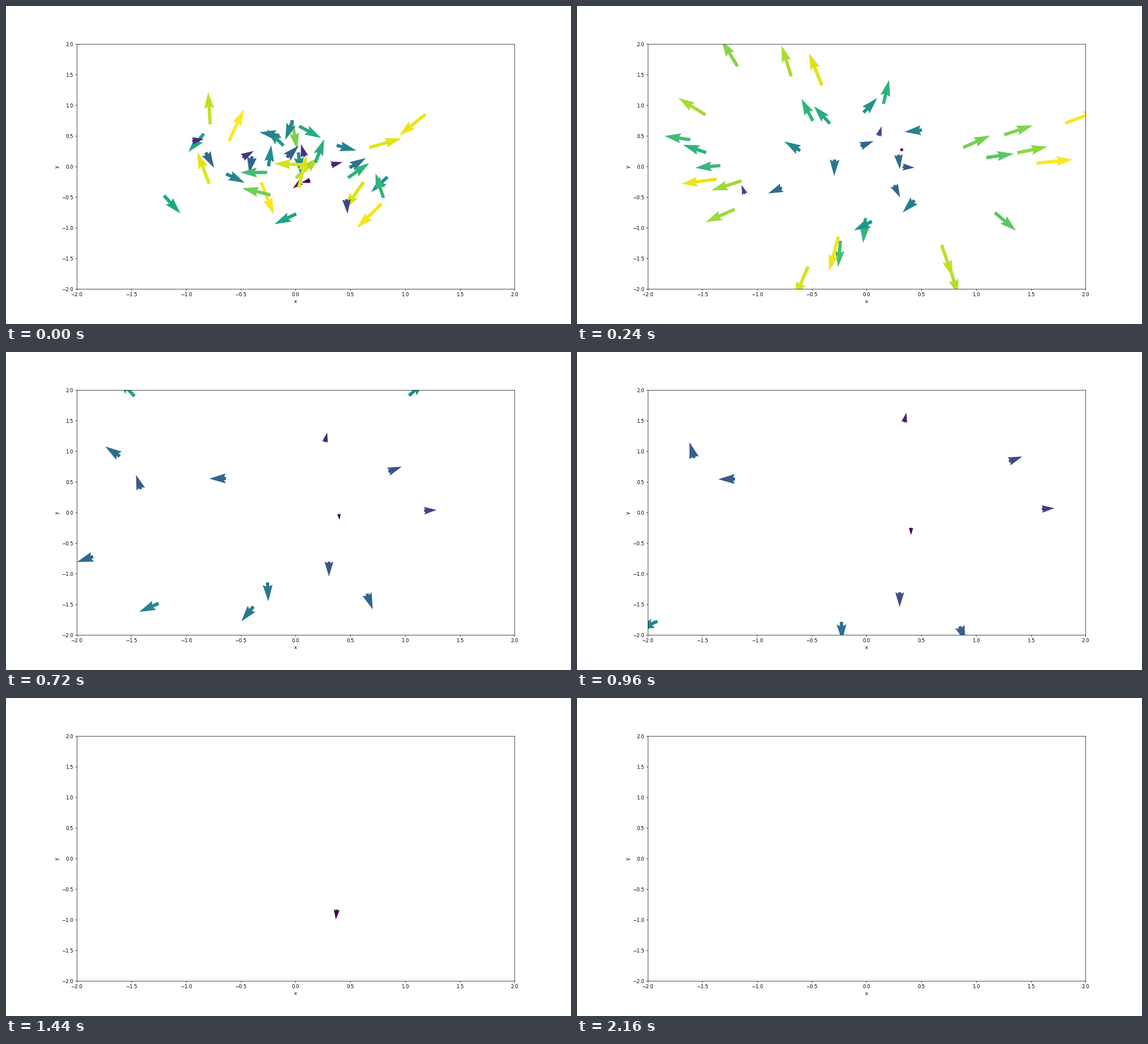
Animation, 998 px wide and 561 px high, one loop 8 s. Source, as a matplotlib script:

```python
import numpy as np
import matplotlib.pyplot as plt
from matplotlib.animation import FuncAnimation

W, H, DPI = 998, 561, 62.375
TICK, STEP, LOOP = 20, 60, 8000          # milliseconds
END = 36                                 # step at which the stage is empty
DRIFT = np.array([0.93, 0.52])           # pixels moved per step and arrow pixel
CENTRE, REACH = np.array([512, 283]), np.array([186, 105])
TAU = 1.5                                # steps in which the starting motion fades
SWARM = 25

rng = np.random.default_rng(4)


def polar(length, angle):
    return np.c_[length * np.cos(angle), length * np.sin(angle)]


# Slow darts: pixel positions at steps 8 and 16; the first two also curve.
slow = np.array([
    (583, 266, 590, 310), (269, 291, 207, 187), (498, 222, 279, 224),
    (549, 194, 578, 124), (588, 229, 763, 193), (656, 283, 821, 277),
    (571, 316, 570, 424), (599, 369, 676, 484), (457, 337, 467, 476),
    (397, 412, 142, 475), (296, 220, 106, 148), (261, 341, 47, 381),
    (517, 394, 357, 504), (606, 133, 818, 21), (338, 143, 116, 13)], float)
near, far = slow[:, :2], slow[:, 2:]
count = SWARM + len(slow)

# Every dart starts in a random direction and is then pushed to its cruise.
start_vel = polar(rng.uniform(12, 62, count),
                  rng.uniform(0, 2 * np.pi, count)) * DRIFT

# Fast swarm: spread over the central square and blown away from its middle.
spot = CENTRE + REACH * rng.uniform(-1, 1, (SWARM, 2))
out = (spot - CENTRE + 2 * start_vel[:SWARM]) / DRIFT
blown = polar(np.linspace(44, 68, SWARM), np.arctan2(out[:, 1], out[:, 0])) * DRIFT

cruise = np.r_[blown, (far - near) / 8]
fade = TAU * (cruise - start_vel)
origin = np.r_[spot - fade[:SWARM], 2 * near - far]
bend = np.zeros((count, 2))
bend[SWARM:SWARM + 2] = (-0.1, 0.15), (0, -0.18)


def state(t):
    """Tails and arrow vectors of all darts at step t."""
    rest = np.exp(-t / TAU)
    pos = origin + cruise * t + bend * (t - 8) * (t - 16) + fade * rest
    vel = cruise + bend * (2 * t - 24) - fade / TAU * rest
    return pos, vel / DRIFT


fig, ax = plt.subplots(figsize=(W / DPI, H / DPI), dpi=DPI)
ax.set(xlim=(-2, 2), ylim=(-2, 2))
ax.set_xlabel("x", labelpad=3)
ax.set_ylabel("y")
to_data = ax.transData.inverted()

zero = np.zeros(count)
arrows = ax.quiver(zero, zero, zero + 1, zero, zero, cmap="viridis",
                   angles="uv", scale_units="dots", scale=1,
                   units="width", width=0.0075)


def draw(frame):
    t = frame * TICK // STEP
    arrows.set_visible(t < END)
    if t < END:
        pos, vec = state(t)
        size = np.hypot(*vec.T)
        arrows.set_offsets(to_data.transform(np.c_[pos[:, 0], H - pos[:, 1]]))
        arrows.set_UVC(vec[:, 0], -vec[:, 1], size)
        arrows.set_clim(size.min(), size.max())
    return [arrows]


anim = FuncAnimation(fig, draw, frames=LOOP // TICK, interval=TICK,
                     repeat=True, repeat_delay=0)
plt.show()
```
